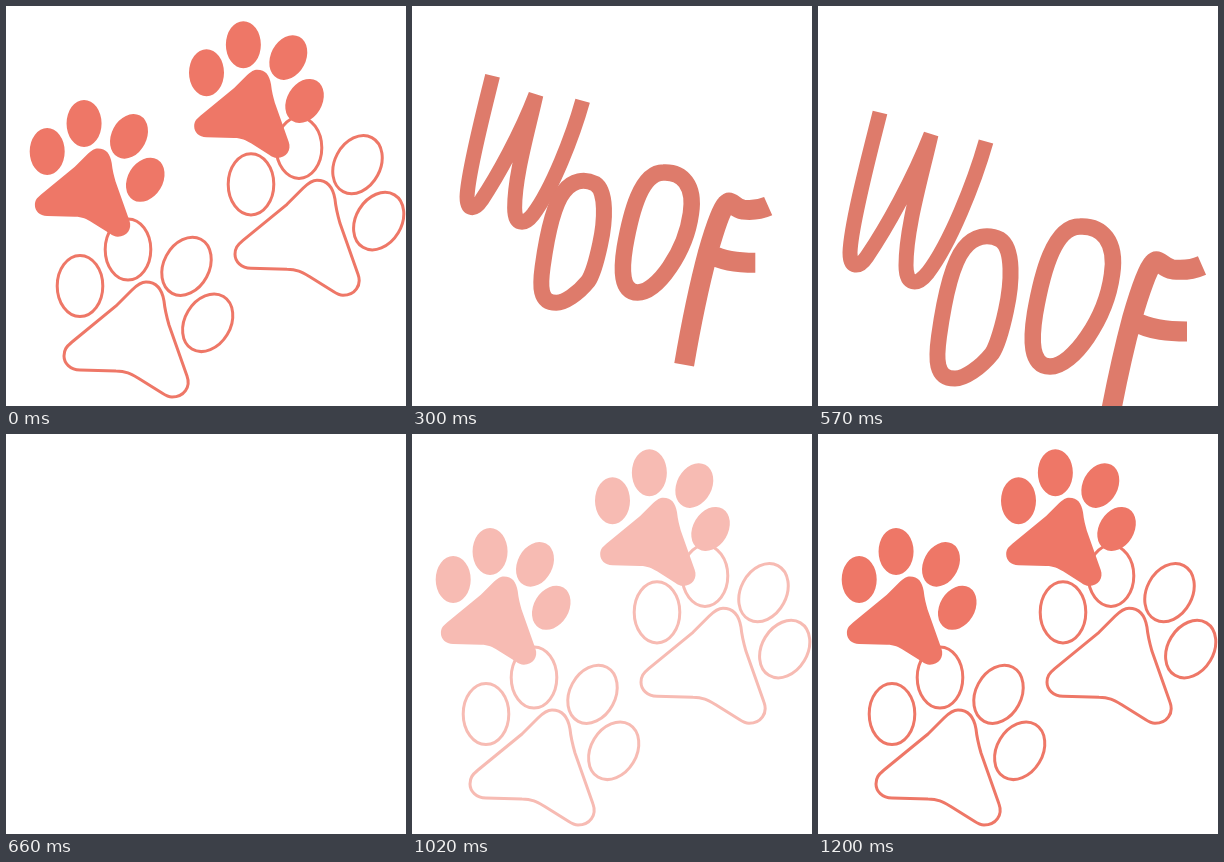
Animation, 400 px wide and 400 px high, one loop 1320 ms. Source, as an HTML page with a canvas:

```html
<!DOCTYPE html>
<html lang="en">
<head>
<meta charset="utf-8">
<title>Woof</title>
<style>
  html, body { margin: 0; width: 100%; height: 100%; overflow: hidden; background: #fff; }
  canvas { display: block; width: 100vw; height: 100vh; }
</style>
</head>
<body>
<canvas id="stage" width="400" height="400"></canvas>
<script>
const ctx = document.getElementById('stage').getContext('2d');
const LOOP = 1320;
const CORAL = [238, 119, 103];
const TEXT = '#de7b6b';
const HUB = { x: 190, y: 222 };

// One paw, relative to the centre of its first toe
const TOES = [[0, 0, 0], [48, -36.5, 0], [106.5, -19.7, 28], [127.7, 36.8, 31]];
const paw = new Path2D(
  'M36 20L52 4C58 -2 62 -4 66 -4C77 -4 82 3 84 15C85 25 87 32 89 39' +
  'L107 90C111 101 104 111 92 111C88 111 85 109 82 107L58 92' +
  'C51 88 46 85 36 85L0 84C-10 84 -16 77 -16 70C-16 64 -14 61 -8 56Z');
for (const [x, y, deg] of TOES) {
  const toe = new Path2D();
  toe.ellipse(x, y, 22.8, 30.6, deg * Math.PI / 180, 0, Math.PI * 2);
  paw.addPath(toe);
}

const star = new Path2D(
  'M-10 150Q212 98 241 25Q245 165 398 169Q320 198 312 345' +
  'Q235 290 130 335Q140 213 -10 150Z');

// c: centre, d: bunching offset, a: bunching stretch
const LETTERS = [
  { d: [0, 41], a: [-0.35, 0.35], c: [100, 132], width: 15, path:
    'M62 44C52 84 33 155 32 184C32 200 41 200 49 188C68 160 95 112 113 66' +
    'C103 110 88 160 88 197C88 217 99 218 110 204C132 175 156 115 168 73' },
  { d: [-9, -28], a: [0, 0], c: [156, 239], width: 16, path:
    'M182 171C196 180 194 215 188 242C182 270 176 282 174 285' +
    'C162 300 146 310 137 310C117 310 118 290 121 268' +
    'C126 232 134 195 146 180C156 167 170 165 182 171Z' },
  { d: [-12, -26], a: [0, 0], c: [255, 228], width: 16.5, path:
    'M262 158C284 157 299 173 294 206C288 250 255 298 232 298' +
    'C212 298 213 270 217 245C224 205 236 158 262 158Z' },
  { d: [-6, -15], a: [0, 0], c: [332, 284], width: 20, path:
    'M286 382C294 335 306 280 314 250C322 222 330 200 335 195' +
    'C341 188 343 199 355 201C365 202 375 201 384 197' +
    'M317 253C333 262 352 263 369 263' }
];
for (const l of LETTERS) l.shape = new Path2D(l.path);

function drawPaw(x, y, scale, filled, color) {
  const p = new Path2D();
  p.addPath(paw, new DOMMatrix([scale, 0, 0, scale, x, y]));
  ctx.fillStyle = ctx.strokeStyle = color;
  ctx.lineWidth = 3;
  if (filled) ctx.fill(p);
  else ctx.stroke(p);
}

function drawPaws(alpha) {
  const color = `rgb(${CORAL.map(v => Math.round(255 + (v - 255) * alpha))})`;
  drawPaw(74, 280, 1, false, color);
  drawPaw(245, 178.3, 1, false, color);
  drawPaw(41.2, 145.5, 0.768, true, color);
  drawPaw(200.5, 66.7, 0.768, true, color);
}

function drawStar(scale) {
  ctx.save();
  ctx.translate(200, 200);
  ctx.scale(scale, scale);
  ctx.translate(-200, -200);
  ctx.fillStyle = '#fff';
  ctx.fill(star);
  ctx.restore();
}

function drawWord(k, drop) {
  const bunch = 9.77 * k * (1 - k) ** 3;
  ctx.strokeStyle = TEXT;
  ctx.lineJoin = 'bevel';
  for (const { shape, width, c, d, a } of LETTERS) {
    const sx = k * (1 + bunch * a[0]);
    const sy = k * (1 + bunch * a[1]);
    const x = HUB.x + k * (c[0] - HUB.x) + bunch * d[0];
    const y = HUB.y + k * (c[1] - HUB.y) + bunch * d[1] + drop;
    const p = new Path2D();
    p.addPath(shape, new DOMMatrix([sx, 0, 0, sy, x - sx * c[0], y - sy * c[1]]));
    ctx.lineWidth = width;
    ctx.stroke(p);
  }
}

// Slow start, fast middle, soft landing
function grow(p) {
  const a = p ** 1.9;
  return a / (a + 1.64 * (1 - p) ** 1.9);
}

function draw(time) {
  const t = Math.floor(time / 30) * 30;
  ctx.fillStyle = '#fff';
  ctx.fillRect(0, 0, 400, 400);
  if (t < 390) {
    const k = grow(t / 390);
    drawPaws(1);
    if (t > 0) {
      drawStar(k / 0.2);
      drawWord(k, 0);
    }
  } else if (t < 660) {
    const p = Math.max(0, (t - 540) / 120);
    drawWord(1, 400 * p * p * (3 - 2 * p));
  } else if (t >= 900) {
    drawPaws(Math.min(1, (Math.floor((t - 900) / 60) + 1) / 6));
  }
}

const start = performance.now();
function tick() {
  draw((performance.now() - start) % LOOP);
  requestAnimationFrame(tick);
}
tick();
</script>
</body>
</html>
```
